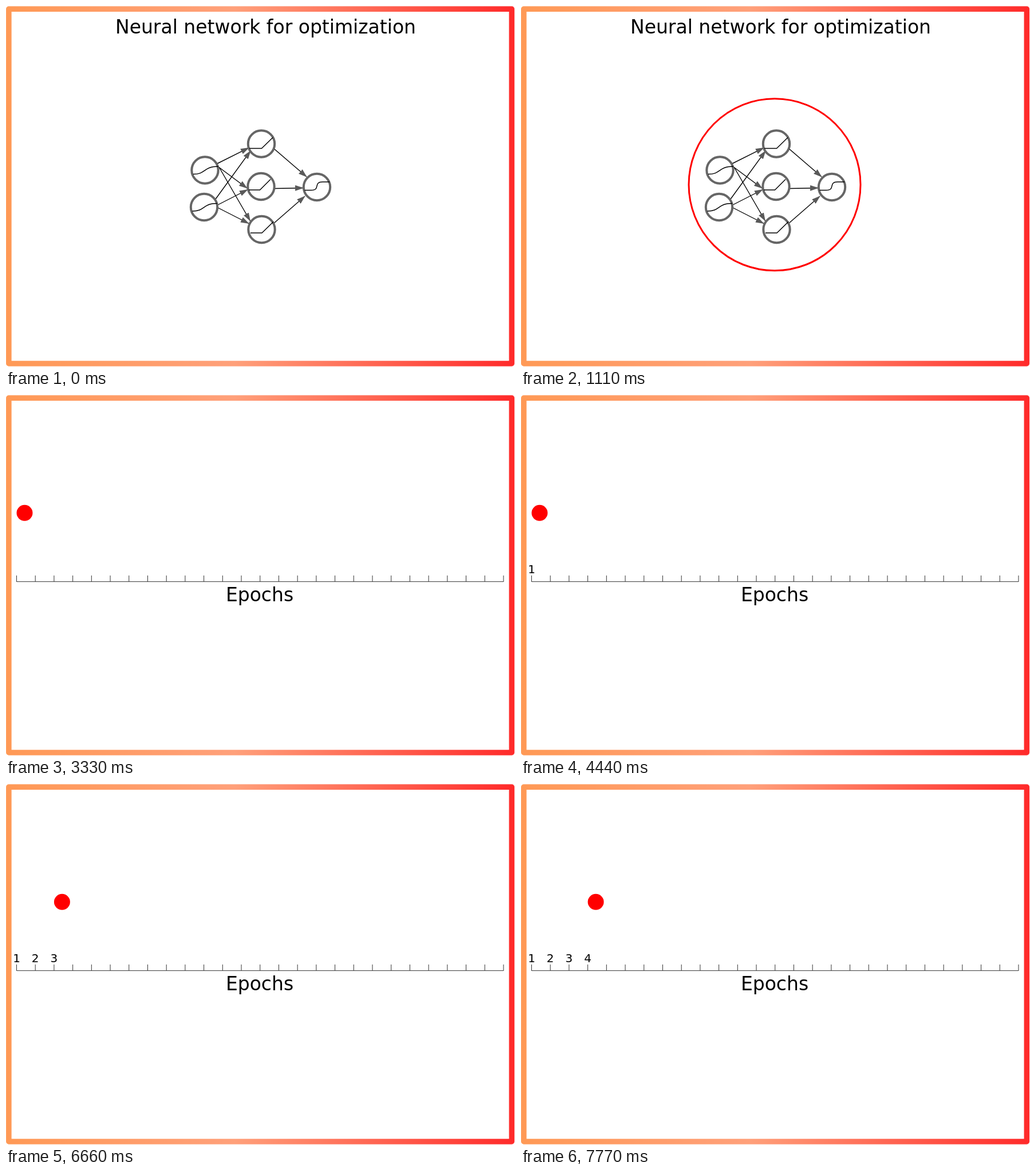
Animation, 889 px wide and 630 px high, one loop 8000 ms. Source, as an HTML page:

```html
<!DOCTYPE html>
<html lang="en">
<head>
<meta charset="utf-8">
<title>Neural network for optimization</title>
<style>
  html, body { margin: 0; width: 100%; height: 100%; overflow: hidden; background: #fff; }
  svg { display: block; width: 889px; height: 630px; }
  text { font: 33px "DejaVu Sans", sans-serif; text-anchor: middle; }
  #numbers text { font-size: 20px; }
  #network { fill: none; stroke: #000; stroke-width: 1.4; }
  #nodes { stroke: #666; stroke-width: 4; }
  #axis { fill: none; stroke: #333; stroke-width: 1; }
</style>
</head>
<body>
<svg viewBox="0 0 889 630">
  <defs>
    <linearGradient id="warm" gradientUnits="userSpaceOnUse" x1="0" y1="0" x2="888" y2="0">
      <stop offset="0" stop-color="#ff9955"/>
      <stop offset=".45" stop-color="#ffa07a"/>
      <stop offset="1" stop-color="#ff2a2a"/>
    </linearGradient>
    <marker id="arrow" markerUnits="userSpaceOnUse" markerWidth="15" markerHeight="10" refX="14" refY="5" orient="auto">
      <path d="M0 0L15 5L0 10z" fill="#595959"/>
    </marker>
  </defs>
  <rect x="4.9" y="5.2" width="878.4" height="618.8" fill="none" stroke="url(#warm)" stroke-width="9.5" stroke-linejoin="round"/>

  <g id="networkScene">
    <text x="453.5" y="48">Neural network for optimization</text>
    <g id="network">
      <g id="edges"></g>
      <g id="nodes"></g>
      <path d="M327 293.5C350 293.5 344 280 371 280M325.500 358C348.500 358 342.500 344.500 369 344.500"/>
      <path d="M425 248.500H446.500L466 229.500M424 321H443.500L462 302.500M427 396H447L467 376.500"/>
      <path d="M521.500 321.500H533C550 321.500 536 307 553 307H565"/>
    </g>
    <circle id="ring" cx="443" cy="311.800" r="150" fill="none" stroke="red" stroke-width="3"/>
  </g>

  <g id="modelScene">
    <text x="442.500" y="48">Model</text>
    <circle cx="443" cy="311.800" r="151.500" fill="red"/>
  </g>

  <g id="epochScene">
    <path id="axis"/>
    <text x="443" y="360">Epochs</text>
    <g id="numbers"></g>
    <circle id="ball" cy="205.800" r="14" fill="red"/>
  </g>
</svg>
<script>
const STEP = 1110, LOOP = 8000;
const TICK_START = 18.5, TICK_GAP = 32.71, TICK_COUNT = 27;
const byId = id => document.getElementById(id);
const tickX = i => TICK_START + i * TICK_GAP;

const nodes = [[347.5, 286.5], [346, 351], [446, 240.5], [445.5, 315], [446.5, 390], [543, 316]];
const edges = [
  [369, 275, 424, 247.5], [370, 280, 421, 318], [372, 281, 426.5, 375],
  [366, 337, 427, 253], [370, 347, 422, 320.5], [370, 352, 424, 379.5],
  [468, 249, 525, 298], [469, 318.5, 519, 317.5], [468, 379, 522, 332]
];
byId('nodes').innerHTML = nodes.map(([x, y]) => `<circle cx="${x}" cy="${y}" r="23.2"/>`).join('');
byId('edges').innerHTML = edges.map(([x1, y1, x2, y2]) =>
  `<path d="M${x1} ${y1}L${x2} ${y2}" marker-end="url(#arrow)"/>`).join('');

let axis = `M${TICK_START} 325.7H${tickX(TICK_COUNT - 1)}`;
for (let i = 0; i < TICK_COUNT; i++) axis += `M${tickX(i)} 315V326`;
byId('axis').setAttribute('d', axis);
byId('numbers').innerHTML = [1, 2, 3, 4].map(n => `<text x="${tickX(n - 1)}" y="311.3">${n}</text>`).join('');

const show = (element, visible) => { element.style.display = visible ? '' : 'none'; };

function draw(time) {
  const step = Math.floor(time / STEP);
  const epoch = step - 3;
  show(byId('networkScene'), step < 2);
  show(byId('ring'), step === 1);
  show(byId('modelScene'), step === 2);
  show(byId('epochScene'), epoch >= 0);
  [...byId('numbers').children].forEach((label, i) => show(label, i < epoch));
  byId('ball').setAttribute('cx', tickX(Math.max(0, epoch - 1)) + 14);
}

const start = performance.now();
function tick() {
  draw((performance.now() - start) % LOOP);
  requestAnimationFrame(tick);
}
tick();
</script>
</body>
</html>
```
